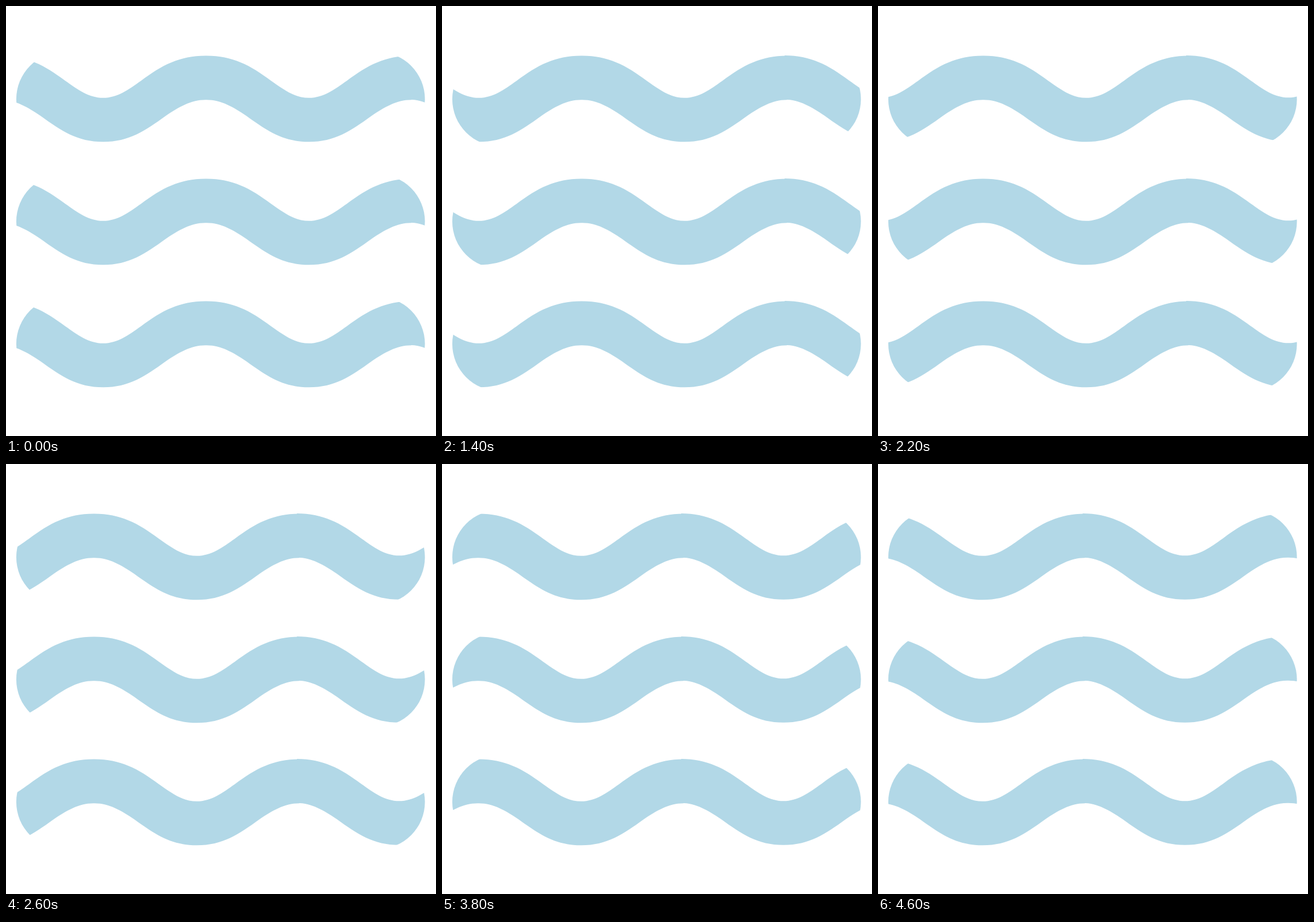
Animation of 748x748 px, one loop 4.7 s. Source, as an HTML page without scripts:

```html
<!DOCTYPE html>
<html lang="en">
<head>
<meta charset="utf-8">
<title>Waves</title>
<style>
  html, body { margin: 0; width: 100%; height: 100%; overflow: hidden; background: #fff; }
  svg { display: block; width: 100%; height: 100%; }
  .wave { fill: #b2d8e7; animation: drift 4.7s steps(47, end) infinite; }
  @keyframes drift {
    from { transform: translateX(0); }
    to { transform: translateX(-352.5px); }
  }
</style>
</head>
<body>
<svg viewBox="0 0 748 748">
  <defs>
    <!-- two periods: upper edge rightwards, lower edge back -->
    <path id="tile" d="M-9 86.5
      c45 0 76 16.5 112 43.5 c22 15.4 41 29.8 66 29.8
      c25 0 44 -14.4 66 -29.8 c36 -27 67 -43.5 112 -43.5 h2
      c45 0 76 16.5 112 43.5 c22 15.4 41 29.8 66 29.8
      c25 0 44 -14.4 66 -29.8 c36 -27 67 -43.5 112 -43.5
      v76.8
      c-26 0 -47 13.2 -69 27.7 c-36 26 -64 45.3 -109 45.3
      c-45 0 -73 -19.3 -109 -45.3 c-22 -14.5 -43 -27.7 -69 -27.7 h-2
      c-26 0 -47 13.2 -69 27.7 c-36 26 -64 45.3 -109 45.3
      c-45 0 -73 -19.3 -109 -45.3 c-22 -14.5 -43 -27.7 -69 -27.7 z"/>
    <g id="strip">
      <use href="#tile"/>
      <use href="#tile" x="710" y="-0.6"/>
    </g>
    <clipPath id="pill">
      <rect x="17.9" y="80" width="710.8" height="164" rx="82"/>
    </clipPath>
  </defs>

  <g clip-path="url(#pill)">
    <use class="wave" href="#strip"/>
  </g>
  <g clip-path="url(#pill)" transform="translate(0 212.8)">
    <use class="wave" href="#strip" y="1.2"/>
  </g>
  <g clip-path="url(#pill)" transform="translate(0 425.8)">
    <use class="wave" href="#strip" y="1.2"/>
  </g>
</svg>
</body>
</html>
```
